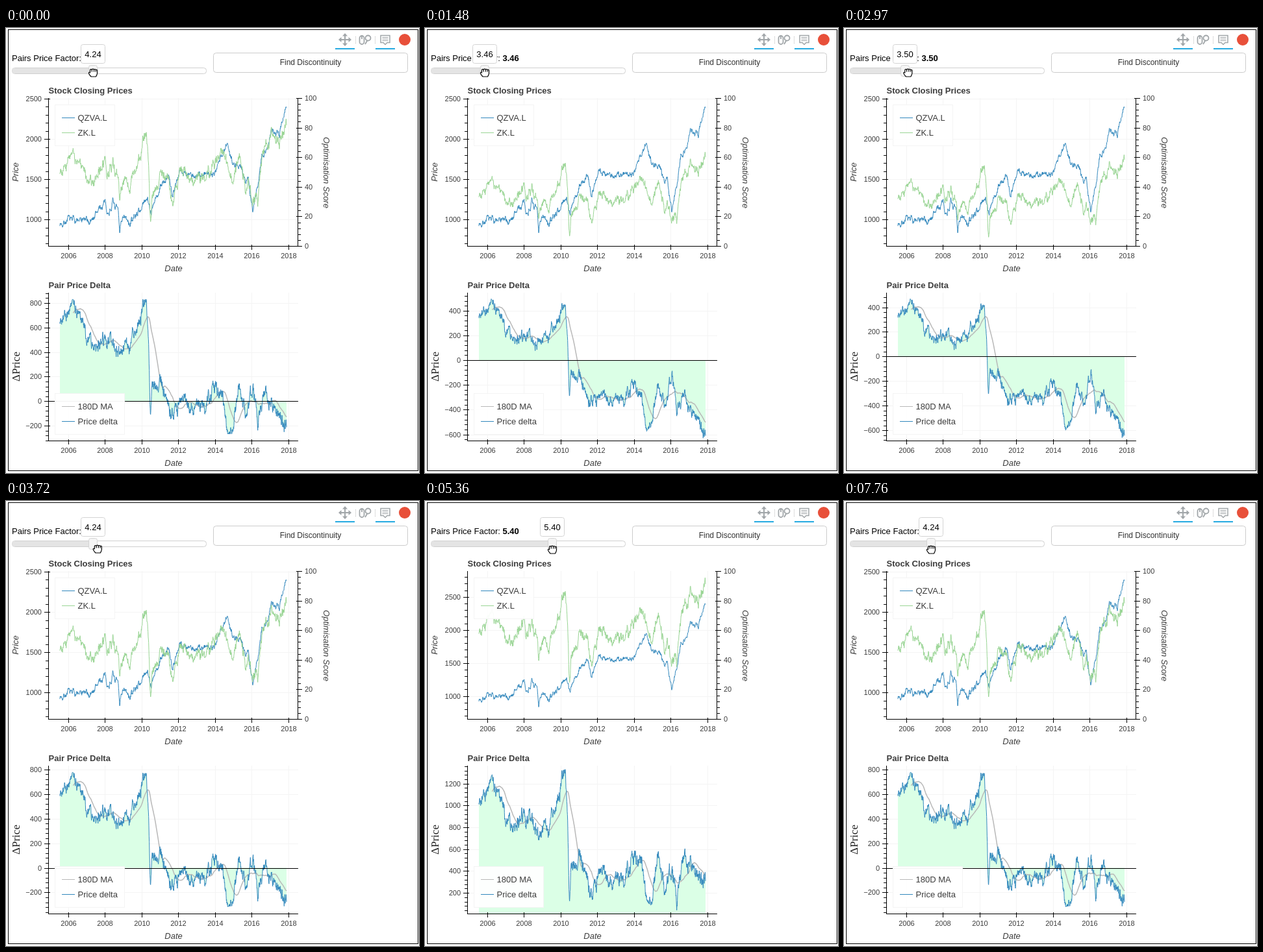
Write an HTML page that moves like this. It is 636 by 686 pixels and loops after 8000 ms.

```html
<!DOCTYPE html>
<html lang="en">
<head>
<meta charset="utf-8">
<title>Pairs price explorer</title>
<style>
  html, body { margin: 0; width: 100%; height: 100%; overflow: hidden; background: #fff; }
  svg { display: block; font-family: "Liberation Sans", Arial, sans-serif; font-size: 13px; fill: #3c3c3c; }
  .tick { font-size: 11px; }
  .crisp { shape-rendering: crispEdges; }
  .line { fill: none; stroke-linejoin: round; }
</style>
</head>
<body>
<script>
const LOOP = 8000, STEP = 149.2, LAST = 52;
const BLUE = '#3288bd', GREEN = '#99d594', GREY = '#b8b8b8', ICON = '#a1a6a9', PALE = '#f4f4f4';
const LEFT = 65, RIGHT = 450, HEIGHT = 228, TOP1 = 108, TOP2 = 408;
const BASE = 4.367; // factor at which the delta key points hold

// step, slider value, how far the charts trail behind it
const MOVES = [
  [0, 4.24, 0.127], [10, 3.46, 0.107], [15, 3.06, 0.06], [17, 3.06, 0], [25, 4.24, 0],
  [30, 5.26, -0.1], [34, 5.5, 0], [35, 5.5, 0], [42, 4.81, 0.1], [52, 4.24, 0]
];

// year, value
const PRICE = [
  [2005.5, 950], [2006, 985], [2007.1, 940], [2007.6, 1110], [2008, 1190], [2008.15, 1050],
  [2008.4, 1220], [2008.7, 1070], [2008.78, 755], [2008.85, 960], [2009, 1050], [2009.3, 920],
  [2010.3, 1275], [2010.5, 1060], [2011.1, 1440], [2011.45, 1510], [2011.65, 1320], [2012.15, 1620],
  [2013, 1550], [2013.95, 1600], [2014.65, 1930], [2014.95, 1720], [2015.35, 1720], [2015.6, 1480],
  [2015.8, 1500], [2016.05, 1140], [2016.35, 1490], [2016.55, 1850], [2016.8, 1860], [2017.05, 2100],
  [2017.5, 2030], [2017.85, 2425], [2017.89, 2340]
];
const DELTA = [
  [2005.5, 650], [2006.25, 800], [2006.8, 610], [2007.15, 490], [2008.4, 495], [2008.78, 390],
  [2009.3, 470], [2009.9, 650], [2010.05, 790], [2010.25, 780], [2010.35, 450], [2010.455, -165],
  [2010.55, 110], [2011.05, 120], [2011.3, -20], [2011.7, -140], [2012.15, 50], [2012.6, -95],
  [2013.75, 0], [2013.85, 155], [2014.4, 50], [2014.67, -255], [2015, -190], [2015.35, 120],
  [2015.65, -110], [2016.05, 140], [2016.3, -150], [2016.75, 100], [2017.05, -20], [2017.4, -80],
  [2017.7, -190], [2017.85, -176], [2017.89, -195]
];

const clamp = (v, a, b) => Math.max(a, Math.min(b, v));
const mix = (a, b, p) => a + (b - a) * p;

// Row of a keyed table at position x, interpolated
function at(keys, x) {
  let i = 0;
  while (i < keys.length - 2 && x >= keys[i + 1][0]) i++;
  const a = keys[i], b = keys[i + 1], p = (x - a[0]) / (b[0] - a[0]);
  return a.map((v, j) => mix(v, b[j], p));
}

function random(seed) {
  return () => {
    seed = seed + 0x6D2B79F5 | 0;
    let t = Math.imul(seed ^ seed >>> 15, 1 | seed);
    t = t + Math.imul(t ^ t >>> 7, 61 | t) ^ t;
    return ((t ^ t >>> 14) >>> 0) / 4294967296;
  };
}

// Key points plus quick and slow mean-reverting noise
function series(keys, quick, slow, seed) {
  const rnd = random(seed);
  let q = 0, s = 0;
  return xs.map(x => {
    q = q * 0.8 + (rnd() - 0.5) * quick;
    s = s * 0.97 + (rnd() - 0.5) * slow;
    return at(keys, 2006 + (x - 96.7) / 28.2)[1] + q + s;
  });
}

const xs = Array.from({ length: 1048 }, (_, i) => 83 + i / 3);
const first = series(PRICE, 52, 14, 7).map(v => clamp(v, 755, 2425));
const gap = series(DELTA, 80, 16, 21).map(v => clamp(v, -267, 830));
const second = first.map((v, i) => clamp((v + gap[i]) / BASE, 222, 515));

function trailingMean(values, width) {
  let sum = 0;
  return values.map((v, i) => {
    sum += v - (i >= width ? values[i - width] : 0);
    return i >= width - 1 ? sum / width : null;
  });
}

const NS = 'http://www.w3.org/2000/svg';
function add(parent, tag, attrs = {}, text) {
  const e = document.createElementNS(NS, tag);
  for (const k in attrs) e.setAttribute(k, attrs[k]);
  if (text !== undefined) e.textContent = text;
  parent.appendChild(e);
  return e;
}
const label = (parent, x, y, text, attrs) => add(parent, 'text', { x, y, ...attrs }, text);
const stroke = (parent, d, color, width = 1, attrs) =>
  add(parent, 'path', { d, fill: 'none', stroke: color, 'stroke-width': width, ...attrs });
const box = (parent, x, y, width, height, attrs) => add(parent, 'rect', { x, y, width, height, ...attrs });

const svg = add(document.body, 'svg', { width: 636, height: 686, viewBox: '0 0 636 686' });
const middle = { 'text-anchor': 'middle' };
const italic = { ...middle, 'font-style': 'italic' };

function legend(y, width, rows) {
  box(svg, 75.5, y - 0.5, width, 63, { fill: '#fff', 'fill-opacity': 0.95, stroke: PALE });
  rows.forEach(([text, color, w], i) => {
    const cy = y + 19.5 + i * 22.5;
    stroke(svg, `M86 ${cy}H106`, color, w, { class: 'crisp' });
    label(svg, 110.5, cy + 4.5, text);
  });
}

// Frame shared by both charts; ticks and curves are filled in at each step
function chart(top, title) {
  const bottom = top + HEIGHT, id = 'clip' + top;
  box(add(svg, 'clipPath', { id }), LEFT, top, RIGHT - LEFT, HEIGHT);
  const grid = add(svg, 'g', { class: 'crisp' });
  const plot = add(svg, 'g', { 'clip-path': `url(#${id})` });
  const axes = add(svg, 'g');
  let lines = `M${LEFT + 0.5} ${top}V${bottom}M${LEFT} ${bottom + 0.5}H${RIGHT}`;
  let rules = '';
  for (let i = 0; i < 7; i++) {
    const x = Math.floor(96.5 + i * 56.45) + 0.5;
    lines += `M${x} ${bottom - 2}V${bottom + 6}`;
    rules += `M${x} ${top}V${bottom}`;
    label(axes, x, bottom + 19, 2006 + i * 2, { ...middle, class: 'tick' });
  }
  stroke(axes, lines, '#000', 1, { class: 'crisp' });
  stroke(grid, rules, PALE);
  label(svg, LEFT + 0.5, top - 7, title, { 'font-weight': 'bold' });
  label(svg, 258, bottom + 39, 'Date', italic);
  return { top, bottom, plot, rules: stroke(grid, '', PALE), ticks: add(svg, 'g') };
}

const curve = (c, color, width = 1) => stroke(c.plot, '', color, width, { class: 'line' });

// Static page
box(svg, 3.5, 2.5, 631, 680, { fill: 'none', stroke: '#000' });
label(svg, 9, 51, 'Pairs Price Factor:', { fill: '#000' });
const shown = label(svg, 119.5, 51, '', { fill: '#000', 'font-weight': 'bold' });
box(svg, 319.5, 38.5, 299, 30, { rx: 4, fill: '#fff', stroke: '#ccc' });
label(svg, 469, 57, 'Find Discontinuity', { ...middle, 'font-size': 12, fill: '#333' });

// Toolbar
stroke(svg, 'M514 18H530M522 10V26', ICON, 2);
add(svg, 'path', { d: 'M522 8l4 4.5h-8zM522 28l4-4.5h-8zM512 18l4.5-4v8zM532 18l-4.5-4v8z', fill: ICON });
box(svg, 544.5, 12, 7, 13, { rx: 3.5, fill: 'none', stroke: ICON, 'stroke-width': 1.8 });
stroke(svg, 'M548 12V17M556.5 19L553 25', ICON, 1.8);
add(svg, 'circle', { cx: 557.5, cy: 15.5, r: 4, fill: 'none', stroke: ICON, 'stroke-width': 1.8 });
stroke(svg, 'M577 11.5H591V22.5H587L584 25.5L581 22.5H577Z', ICON, 1.5);
stroke(svg, 'M579.5 14.5H588.5M579.5 17H588.5M579.5 19.5H588.5', ICON, 1);
stroke(svg, 'M538.5 13V24M568.5 13V24', '#ccc', 1, { 'stroke-dasharray': '2 1' });
stroke(svg, 'M507 32H537M569 32H599', '#26aae1', 2);
add(svg, 'circle', { cx: 614, cy: 18, r: 9, fill: '#e8503a' });

// Price chart
const upper = chart(TOP1, 'Stock Closing Prices');
const firstLine = curve(upper, BLUE), secondLine = curve(upper, GREEN);
legend(119, 92, [['QZVA.L', BLUE, 1], ['ZK.L', GREEN, 1]]);
let side = `M449.5 ${TOP1}V${TOP1 + HEIGHT}`;
for (let v = 0; v <= 100; v += 4) {
  const y = Math.round(336 - v * 2.28) + 0.5, major = v % 20 === 0;
  side += `M${major ? 447 : 450} ${y}H${major ? 456 : 454}`;
  if (major) label(svg, 460, y + 3.5, v, { class: 'tick' });
}
stroke(svg, side, '#000', 1, { class: 'crisp' });
label(svg, 0, 0, 'Price', { ...italic, transform: 'translate(19 222) rotate(-90)' });
label(svg, 0, 0, 'Optimisation Score', { ...italic, transform: 'translate(489 223) rotate(90)' });

// Delta chart
const lower = chart(TOP2, 'Pair Price Delta');
const band = add(lower.plot, 'path', { fill: '#dbffe6' });
const meanLine = curve(lower, GREY, 1.5), gapLine = curve(lower, BLUE);
const zero = stroke(lower.plot, '', '#000', 1, { class: 'crisp' });
legend(564, 107, [['180D MA', GREY, 1.5], ['Price delta', BLUE, 1]]);
label(svg, 0, 0, 'ΔPrice', {
  ...middle, fill: '#222', transform: 'translate(21 522) rotate(-90)',
  'font-family': '"Liberation Serif", "Times New Roman", serif', 'font-size': 17
});

// Slider
box(svg, 9.5, 61.5, 299, 9, { rx: 4, fill: '#fff', stroke: '#d0d0d0' });
const filled = box(svg, 10, 62, 0, 8, { rx: 3.5, fill: '#e4e4e4' });
const handle = add(svg, 'g');
box(handle, -6.5, 57.5, 13, 17, { rx: 3, fill: '#f4f4f4', stroke: '#d4d4d4' });
box(handle, -18.5, 25.5, 37, 29, { rx: 3, fill: '#fff', stroke: '#d4d4d4' });
const tip = label(handle, 0, 44.5, '', { ...middle, fill: '#000' });
const hand = add(svg, 'g', { stroke: '#000', 'stroke-width': 1.2, 'stroke-linejoin': 'round' });
add(hand, 'path', {
  fill: '#fff',
  d: 'M-4.5 0V-3.5a1.4 1.4 0 0 1 2.8-.8a1.6 1.6 0 0 1 3.2 0a1.4 1.4 0 0 1 2.8.5' +
     'a1.1 1.1 0 0 1 2.2.5V1Q6 3.5 4.5 6H-3Q-6 2.5-6.5.8T-4.5-1z'
});
add(hand, 'path', { fill: 'none', d: 'M-1.7-4V-1.5M1.5-4V-1.5M4.3-3.5V-1.5' });

// Pads the range by 5% at each end, draws its ticks, returns the value-to-y map
function scale(c, low, high, major) {
  const pad = (high - low) * 0.05, bottom = low - pad, top = high + pad;
  const toY = v => c.bottom - (v - bottom) / (top - bottom) * HEIGHT;
  const minor = major / 5;
  let marks = '', rules = '';
  c.ticks.textContent = '';
  for (let n = Math.ceil(bottom / minor); n * minor <= top; n++) {
    const v = n * minor, y = Math.round(toY(v)) + 0.5;
    if (n % 5) { marks += `M61 ${y}H65`; continue; }
    marks += `M59 ${y}H68`;
    rules += `M${LEFT} ${y}H${RIGHT}`;
    label(c.ticks, 55, y + 3.5, String(v).replace('-', '−'), { class: 'tick', 'text-anchor': 'end' });
  }
  stroke(c.ticks, marks, '#000', 1, { class: 'crisp' });
  c.rules.setAttribute('d', rules);
  return toY;
}

function trace(values, toY) {
  let d = '';
  values.forEach((v, i) => {
    if (v !== null) d += `${d ? 'L' : 'M'}${xs[i].toFixed(2)} ${toY(v).toFixed(2)}`;
  });
  return d;
}

function drawCharts(k) {
  const scaled = second.map(v => v * k), delta = scaled.map((v, i) => v - first[i]);
  const y1 = scale(upper, Math.min(755, 222 * k), Math.max(2425, 515 * k), 500);
  firstLine.setAttribute('d', trace(first, y1));
  secondLine.setAttribute('d', trace(scaled, y1));

  // Extremes of the delta move linearly with the factor
  const d = k - BASE;
  const low = Math.min(-267 + 394 * d, -165 + 226 * d, -181 + 518 * d);
  const high = Math.max(830 + 423 * d, 826 + 455 * d);
  const y2 = scale(lower, low, high, 200);
  const path = trace(delta, y2), y0 = y2(0);
  gapLine.setAttribute('d', path);
  band.setAttribute('d', `${path}V${y0}H83Z`);
  meanLine.setAttribute('d', trace(trailingMean(delta, 62), y2));
  zero.setAttribute('d', `M${LEFT} ${Math.round(y0) + 0.5}H${RIGHT}`);
}

function draw(step) {
  const [, value, lag] = at(MOVES, step);
  const x = Math.round(134 + (value - 4.24) * 53.6);
  // The pointer runs ahead on the way up and drifts down a little
  const lead = 7 * Math.sin(Math.PI * clamp((step - 17) / 14, 0, 1));
  const drop = 6 * clamp((step - 20) / 6, 0, 1);
  shown.textContent = tip.textContent = value.toFixed(2);
  filled.setAttribute('width', x - 10);
  handle.setAttribute('transform', `translate(${x} 0)`);
  hand.setAttribute('transform', `translate(${x + lead} ${69 + drop})`);
  drawCharts(value + lag);
}

let current = -1;
const start = performance.now();
function tick(now) {
  const t = Math.max(0, now - start) % LOOP;
  const step = Math.min(LAST, Math.floor((t + 15) / STEP));
  if (step !== current) draw(current = step);
  requestAnimationFrame(tick);
}
tick(start);
</script>
</body>
</html>
```
